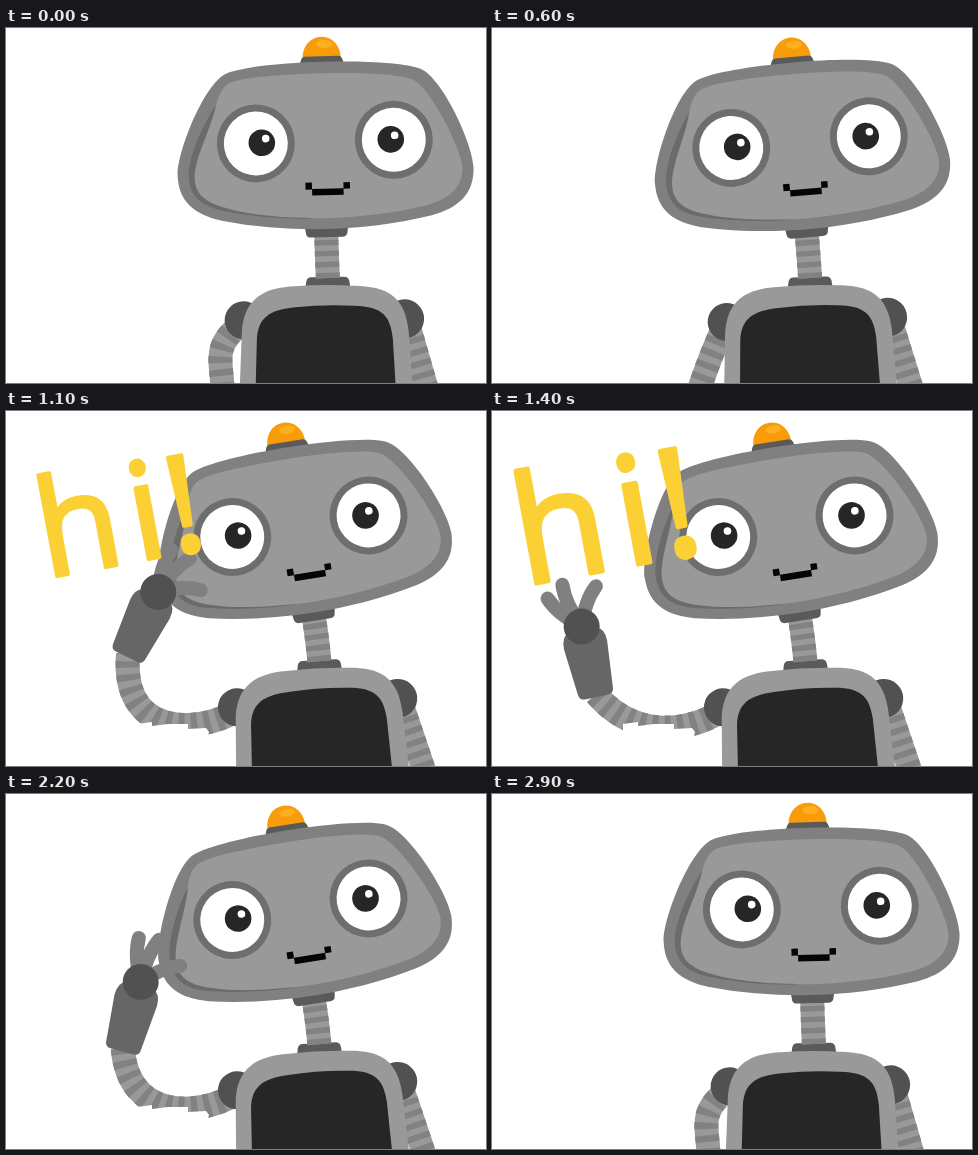
An HTML page with a canvas for the animation above (3000 ms loop, 480x355 px).

```html
<!DOCTYPE html>
<html lang="en">
<head>
<meta charset="utf-8">
<title>Waving robot</title>
<style>
  html, body { margin: 0; width: 100%; height: 100%; overflow: hidden; background: #fff; }
  canvas { display: block; }
</style>
</head>
<body>
<canvas id="stage" width="480" height="355"></canvas>
<script>
const ctx = document.getElementById('stage').getContext('2d');
const LOOP = 3000, STEP = 100, RAD = Math.PI / 180;
const LIGHT = '#999', MID = '#808080', STRIPE = '#828282', DARK = '#5a5a5a', JOINT = '#515151', BLACK = '#262626';

const mix = (a, b, u) => a + (b - a) * u;
const span = (t, from, to) => Math.min(1, Math.max(0, (t - from) / (to - from)));
const ramp = (t, from, to) => { const u = span(t, from, to); return u * u * (3 - 2 * u); };
const bump = (t, from, to) => Math.sin(Math.PI * span(t, from, to));

function headTilt(t) {
  const idle = -1.5 + 2 * bump(t, 0, 700);
  const greet = ramp(t, 450, 750) - ramp(t, 2300, 2570);
  return mix(idle, -9, greet) - 2.3 * bump(t, 600, 1100);
}

function greetingScale(t) {
  return ramp(t, 600, 840) * (1 + .12 * bump(t, 1100, 1600)) * (1 - ramp(t, 1550, 1900));
}

// The raised arm waves; lowering it sweeps the elbow out in an arc
function armPose(t) {
  const drop = 1 - ramp(t, 500, 900) + ramp(t, 2500, 2850);
  const arc = 4 * drop * (1 - drop);
  const wave = Math.cos(2 * Math.PI * (t - 1100) / 600) * (1 - ramp(t, 2100, 2500));
  return {
    drop,
    x: mix(113 + 9 * wave, 215, drop) - 39 * arc,
    y: mix(263 - 20 * wave, 372, drop) + 55 * arc,
    forearm: mix(7 + 19 * wave, -165, drop),
    hand: mix(8 + 34 * wave, -165, drop) - 80 * arc,
    bendY: 322 + 100 * arc,
    lowX: mix(128 - 13 * wave, 222, drop),
    lowY: mix(327, 345, drop) + 100 * arc
  };
}

function fill(d, color) {
  ctx.fillStyle = color;
  ctx.fill(new Path2D(d));
}

function oval(x, y, rx, ry, color) {
  ctx.fillStyle = color;
  ctx.beginPath();
  ctx.ellipse(x, y, rx, ry, 0, 0, 2 * Math.PI);
  ctx.fill();
}

const disc = (x, y, r, color) => oval(x, y, r, r, color);

function stroke(d, color, width, dash = [], cap = 'butt') {
  ctx.strokeStyle = color;
  ctx.lineWidth = width;
  ctx.lineCap = cap;
  ctx.setLineDash(dash);
  ctx.stroke(new Path2D(d));
  ctx.setLineDash([]);
}

function tube(d, stripe) {
  stroke(d, LIGHT, 24);
  stroke(d, STRIPE, 24, [stripe, stripe]);
}

function group(x, y, degrees, draw) {
  ctx.save();
  ctx.translate(x, y);
  ctx.rotate(degrees * RAD);
  draw();
  ctx.restore();
}

function rotated(x, y, px, py, degrees) {
  const c = Math.cos(degrees * RAD), s = Math.sin(degrees * RAD);
  const dx = x - px, dy = y - py;
  return [px + dx * c - dy * s, py + dx * s + dy * c];
}

function drawBody() {
  tube('M404 299 L424 371', 6);
  disc(239, 291.5, 19, JOINT);
  disc(400, 291.5, 19.5, JOINT);
  fill('M307 249 H340 Q344 249 345 253 L346 260 H301 L302 253 Q303 249 307 249Z', DARK);
  fill('M234 370 L237 305 C239 268 262 259 290 258 Q320 256 350 258 C382 259 401 268 404 305 L408 370Z', LIGHT);
  fill('M250 370 L252 312 C253 289 265 281 291 279 Q320 276 350 278 C378 279 386 289 388 311 L391 370Z', BLACK);
}

function drawEye(x, y, look) {
  disc(x, y, 39, '#6e6e6e');
  disc(x, y, 32, '#fff');
  disc(x + look, y - .5, 13.3, BLACK);
  disc(x + look + 4, y - 4.5, 3.8, '#fff');
}

function drawHead() {
  fill('M-21 -5 H22 L21 1 Q20 4 16 4 H-15 Q-19 4 -20 1Z', DARK);
  oval(0, -176, 19, 20.5, '#f89c0a');
  oval(3, -189, 8, 4, '#ffb020');
  fill('M-17 -177 H17 Q21 -177 22 -168 H-22 Q-21 -177 -17 -177Z', DARK);
  fill('M1 -171.5 C45 -171.5 84 -168 98 -162 C120 -153 149 -85 149 -62 C149 -35 133 -22 106 -15 ' +
       'C71 -7 31 -4 1 -4 C-29 -4 -69 -7 -104 -15 C-131 -22 -147 -35 -147 -62 ' +
       'C-147 -85 -118 -153 -96 -162 C-82 -168 -43 -171.5 1 -171.5Z', MID);
  fill('M-100 -140 C-120 -115 -136 -80 -136 -60 C-135 -38 -122 -29 -98 -24 C-70 -18 -40 -15 -15 -15Z', '#6b6b6b');
  fill('M0 -160 C40 -160 80 -157 91 -151 C108 -142 137 -82 138 -62 C138 -42 124 -31 100 -25 ' +
       'C68 -18 30 -15 0 -15 C-40 -16 -75 -20 -97 -27 C-120 -33 -131 -43 -130 -60 ' +
       'C-129 -80 -112 -108 -107 -130 C-103 -144 -98 -152 -88 -154 C-75 -158 -40 -160 0 -160Z', LIGHT);
  drawEye(-68, -91.5, 6);
  drawEye(70, -91.5, -3);
  fill('M-19.5 -51 h6.5 v6.5 h31.5 v-6 h6.5 v6.5 h-6.5 v6 h-31.5 v-6 h-6.5Z', '#050505');
}

function drawArm(arm, sx, sy) {
  const { x, y, bendY, lowX, lowY } = arm;
  tube(`M${sx} ${sy} C${sx - 35} ${bendY} ${lowX} ${lowY} ${x} ${y}`, 6.5);
  // The raised arm has a ragged lower edge
  if (arm.drop < .1) {
    fill('M131 313 L146 311 V315 L162 313 H182 V318 L200 317 L203 321 L201 329 L210 327 L216 321 V350 H131Z', '#fff');
  }
}

function drawHand({ x, y, forearm, hand }) {
  const [px, py] = rotated(x, y - 69, x, y, forearm);
  group(px, py, hand, () => {
    for (const finger of [-1, 0, 1.7]) {
      const length = 46 - 2 * Math.abs(finger);
      group(0, 0, 26 * finger, () => stroke(`M0 0 Q-5 ${-length * .6} 1 ${-length}`, MID, 14, [], 'round'));
    }
  });
  group(x, y, forearm, () =>
    fill('M-12 3 H12 Q18 3 18 -4 L22 -50 Q22 -63 14 -65 H-14 Q-22 -63 -22 -50 L-18 -4 Q-18 3 -12 3Z', '#666'));
  disc(px, py, 18, JOINT);
}

function drawGreeting(scale) {
  if (scale < .01) return;
  ctx.save();
  ctx.translate(110.5, 102.5);
  ctx.scale(scale, scale);
  ctx.translate(-53, 61.5);
  ctx.rotate(-10.5 * RAD);
  ctx.font = '400 135px "Open Sans", "Noto Sans", sans-serif';
  ctx.fillStyle = ctx.strokeStyle = '#fbd035';
  ctx.lineWidth = 4;
  ctx.lineJoin = 'round';
  for (const [letter, x] of [['h', -18], ['i', 75], ['!', 113]]) {
    ctx.fillText(letter, x, 0);
    ctx.strokeText(letter, x, 0);
  }
  ctx.restore();
}

function render(t) {
  const tilt = headTilt(t), lean = tilt * .35, arm = armPose(t);
  const turn = (x, y) => rotated(x, y, 322, 440, lean);
  const [cx, cy] = turn(323.6, 253);
  const nx = cx + tilt * .52 - .9, ny = 205 - tilt * .08;
  const [qx, qy] = rotated(nx, ny + 25, nx, ny, tilt);

  ctx.fillStyle = '#fff';
  ctx.fillRect(0, 0, 480, 355);
  drawArm(arm, ...turn(236, 296));
  group(...turn(0, 0), lean, drawBody);
  tube(`M${cx} ${cy - 3} Q${qx} ${qy} ${nx} ${ny}`, 5.5);
  group(nx, ny, tilt, drawHead);
  drawHand(arm);
  drawGreeting(greetingScale(t));
}

function tick() {
  // The motion is stepped at ten pictures per second
  render(Math.floor(performance.now() % LOOP / STEP) * STEP);
  requestAnimationFrame(tick);
}
tick();
</script>
</body>
</html>
```
